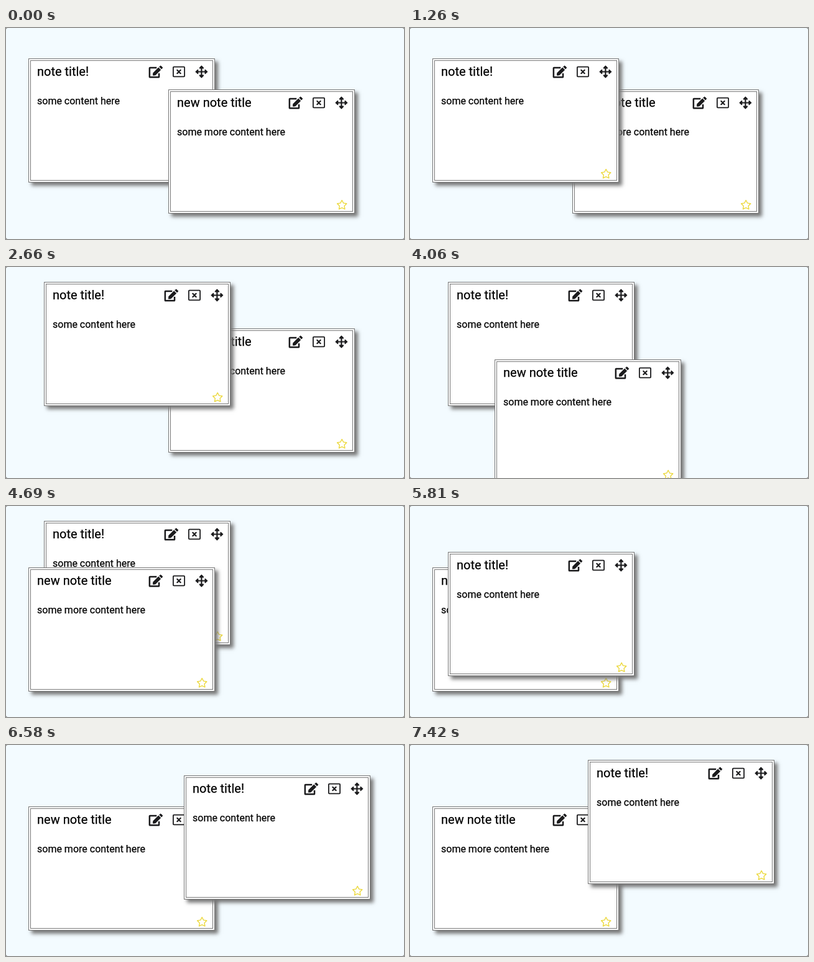
Recreate the animation shown at these times as an HTML page. Size 640 by 340 pixels, loop 7560 ms.

```html
<!DOCTYPE html>
<html lang="en">
<head>
<meta charset="utf-8">
<title>Draggable notes</title>
<style>
html, body { margin: 0; width: 100%; height: 100%; overflow: hidden; background: #777; }
#board { position: relative; width: 640px; height: 340px; overflow: hidden; border-radius: 3px; background: #f3fbff; }
.note {
  position: absolute; left: 0; top: 0; box-sizing: border-box; width: 300px; height: 200px;
  border: 4px double #777; background: #fff; box-shadow: 5px 5px 6px #777;
}
.note svg { position: absolute; left: -4px; top: -4px; }
text { font: 16px Roboto, Arial, sans-serif; fill: #000; stroke: #000; stroke-width: .25px; }
text.title { font-size: 20px; }
</style>
</head>
<body>
<div id="board"></div>
<script>
const LOOP = 7560, CELL = 25, LEFT = 36, TOP = 24;
const INK = '#1b1b1d';

const starPoints = Array.from({ length: 10 }, (_, i) => {
  const r = i % 2 ? 4.1 : 8, a = i * Math.PI / 5;
  return [r * Math.sin(a), -r * Math.cos(a)].map(v => v.toFixed(2)).join();
}).join(' ');

const arrowHeads = [0, 90, 180, 270].map(a =>
  `<path transform="rotate(${a})" d="M-3-5.9L0-9.1L3-5.9z" fill="${INK}" stroke-width="1.6"/>`).join('');

const icons = `
  <g stroke="${INK}" fill="none" stroke-linejoin="round">
    <g transform="translate(193.6 11.3) scale(.0395)">
      <path d="M322 96H48Q32 96 32 112V464Q32 480 48 480H400Q416 480 416 464V322" stroke-width="64"/>
      <path d="M396 90L486 180L270 396L170 406L180 306z" fill="${INK}" stroke-width="20"/>
      <path d="M432 54L488 15L561 88L522 144z" fill="${INK}" stroke-width="24"/>
    </g>
    <g transform="translate(242 21.5)">
      <rect x="-9.1" y="-7.9" width="18.2" height="15.8" rx="1.2" stroke-width="1.8"/>
      <path d="M-2.7-2.7L2.7 2.7M2.7-2.7L-2.7 2.7" stroke-width="2.2" stroke-linecap="round"/>
    </g>
    <g transform="translate(278.4 21.5)">
      <path d="M-6 0H6M0-6V6" stroke-width="2.2"/>${arrowHeads}
    </g>
  </g>
  <polygon transform="translate(279.2 186.5)" points="${starPoints}" fill="none"
    stroke="#ecd93f" stroke-width="1.4" stroke-linejoin="round"/>`;

function makeNote(title, content, col, row, drags) {
  const el = document.createElement('div');
  el.className = 'note';
  el.innerHTML = `<svg width="300" height="200">
    <text class="title" x="14" y="28">${title}</text>
    <text x="14" y="74">${content}</text>${icons}</svg>`;
  document.getElementById('board').append(el);
  return { el, col, row, drags };
}

// Home cell, then the drags: when each starts and ends, and the cell it reaches.
const first = makeNote('note title!', 'some content here', 0, 1, [
  { start: 1440, end: 1940, col: 3, row: 3 },
  { start: 2020, end: 2600, col: 1, row: 0 },
  { start: 5710, end: 5840, col: 1, row: 2 },
  { start: 5840, end: 6250, col: 9, row: 4 },
  { start: 6250, end: 6700, col: 10, row: 0 }
]);
const second = makeNote('new note title', 'some more content here', 9, 3, [
  { start: 3820, end: 4050, col: 4, row: 5 },
  { start: 4080, end: 4460, col: 0, row: 4 },
  { start: 4660, end: 4720, col: 0, row: 3 }
]);

// Steady pointer motion, snapped to the nearest grid cell.
function cellAt({ col, row, drags }, t) {
  for (const drag of drags) {
    const u = Math.min(1, Math.max(0, (t - drag.start) / (drag.end - drag.start)));
    col += (drag.col - col) * u;
    row += (drag.row - row) * u;
  }
  return [Math.round(col), Math.round(row)];
}

function draw() {
  const t = performance.now() % LOOP;
  const front = t >= 1260 && t < 3500 || t >= 5600 ? first : second;
  for (const note of [first, second]) {
    const [col, row] = cellAt(note, t);
    note.el.style.transform = `translate(${LEFT + col * CELL}px, ${TOP + row * CELL}px)`;
    note.el.style.zIndex = note === front ? 2 : 1;
  }
  requestAnimationFrame(draw);
}
draw();
</script>
</body>
</html>
```
